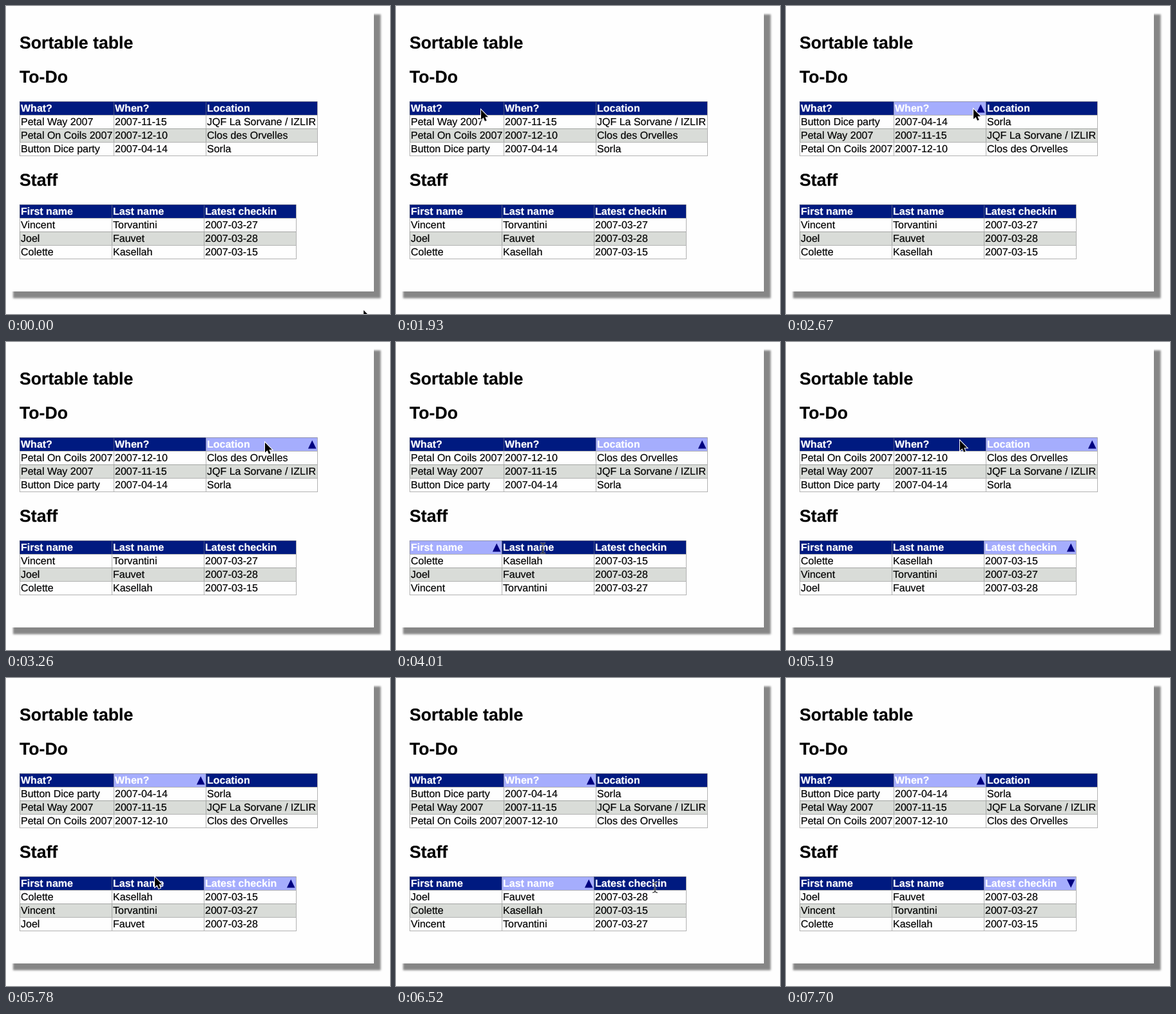
An HTML page for the animation above (8.73 s loop, 596 by 478 pixels).

```html
<!DOCTYPE html>
<html lang="en">
<head>
<meta charset="utf-8">
<title>Sortable table</title>
<style>
  html, body { margin: 0; width: 100%; height: 100%; overflow: hidden; background: #fefefe; }
  svg { display: block; width: 596px; height: 478px; }
  text {
    font: 16px "Liberation Sans", Arial, sans-serif; white-space: pre;
    text-rendering: geometricPrecision; stroke: #000; stroke-width: .2px;
  }
  .title { font-size: 26.67px; font-weight: bold; }
  .head { font-weight: bold; fill: #fff; stroke: #fff; }
  .grid { fill: none; stroke: #808080; stroke-opacity: .6; shape-rendering: crispEdges; }
  .flat { shape-rendering: crispEdges; }
</style>
</head>
<body>
<svg viewBox="0 0 596 478">
  <defs>
    <filter id="soft" x="-5%" y="-5%" width="110%" height="110%"><feGaussianBlur stdDeviation="1.5"/></filter>
  </defs>
  <rect width="596" height="478" fill="#fefefe"/>
  <rect x="11" y="13" width="570.5" height="440.5" fill="#868686" filter="url(#soft)"/>
  <rect class="flat" width="571" height="443" fill="#fefefe"/>
  <text class="title" x="21" y="66">Sortable table</text>
  <text class="title" x="21" y="119">To-Do</text>
  <text class="title" x="21" y="279">Staff</text>
  <g id="tables"></g>
  <path id="arrow" d="M0 0V15.5L3.6 12.2L6 17.8L8.7 16.7L6.3 11.2H11Z" stroke="#fff" stroke-width="2" paint-order="stroke"/>
  <g id="beam" fill="none">
    <path class="bar" stroke="#fff" stroke-opacity=".5" stroke-width="2.4"/>
    <path class="bar" stroke="#222" stroke-width="1.1"/>
  </g>
</svg>
<script>
const LOOP = 8730, STEP = 148.05, LAST = 52, ROW = 21;
const NAVY = '#001a80', LIT = '#a5adfd', BAND = '#d9dcd8';
const $ = id => document.getElementById(id);

function add(parent, tag, attrs, label) {
  const el = document.createElementNS('http://www.w3.org/2000/svg', tag);
  for (const key in attrs) el.setAttribute(key, attrs[key]);
  if (label) el.textContent = label;
  parent.appendChild(el);
  return el;
}

function makeTable(top, cols, heads, rows) {
  const g = add($('tables'), 'g', {});
  const left = cols[0], right = cols[3];
  const label = (c, r, attrs, text) =>
    add(g, 'text', { x: cols[c] + 2, y: top + 16 + r * ROW, ...attrs }, text);

  const cells = heads.map((h, c) => add(g, 'rect', {
    class: 'flat', x: cols[c], y: top, width: cols[c + 1] - cols[c], height: ROW
  }));
  add(g, 'rect', { class: 'flat', x: left, y: top + 2 * ROW, width: right - left, height: ROW, fill: BAND });
  let lines = cols.map(x => `M${x + .5} ${top}V${top + 4 * ROW + 1}`).join('');
  for (let r = 0; r <= 4; r++) lines += `M${left} ${top + r * ROW + .5}H${right + 1}`;
  add(g, 'path', { class: 'grid', d: lines });
  heads.forEach((h, c) => label(c, 0, { class: 'head' }, h));
  const texts = rows.map((row, r) => row.map((v, c) => label(c, r + 1, {})));
  const mark = add(g, 'path', { d: 'M-6.3 6.5H6.3L0-6.5Z', fill: '#000080' });

  return {
    headAt: ([x, y]) => y >= top && y < top + ROW ? heads.findIndex((h, c) => x >= cols[c] && x < cols[c + 1]) : -1,
    show({ col, dir }) {
      const order = rows.slice();
      if (dir) order.sort((a, b) => (a[col] < b[col] ? -dir : dir));
      texts.forEach((line, r) => line.forEach((t, c) => { t.textContent = order[r][c]; }));
      cells.forEach((cell, c) => cell.setAttribute('fill', c === col ? LIT : NAVY));
      mark.setAttribute('visibility', dir ? 'visible' : 'hidden');
      if (dir) mark.setAttribute('transform', `translate(${cols[col + 1] - 7.8} ${top + 11}) scale(1 ${dir})`);
    }
  };
}

const tables = [
  makeTable(148, [21, 167, 310, 483], ['What?', 'When?', 'Location'], [
    ['Petal Way 2007', '2007-11-15', 'JQF La Sorvane / IZLIR'],
    ['Petal On Coils 2007', '2007-12-10', 'Clos des Orvelles'],
    ['Button Dice party', '2007-04-14', 'Sorla']
  ]),
  makeTable(308, [21, 164, 307, 450], ['First name', 'Last name', 'Latest checkin'], [
    ['Vincent', 'Torvantini', '2007-03-27'],
    ['Joel', 'Fauvet', '2007-03-28'],
    ['Colette', 'Kasellah', '2007-03-15']
  ])
];
const labels = [...$('tables').querySelectorAll('text')];

// The pointer rests one step at each stop, then eases to the next.
const stop = (step, x, y) => ({ step, x, y });
const trips = [
  [stop(0, 555, 472), stop(1, 520, 345), stop(3, 583, 89)],
  [stop(8, 584, 195), stop(10, 400, 128), stop(13, 132, 161), stop(16, 211, 160),
   stop(18, 291, 160), stop(21, 402, 156), stop(25, 132, 315), stop(27, 228, 320),
   stop(30, 400, 320), stop(35, 270, 153), stop(40, 228, 319), stop(44, 402, 325),
   stop(48, 407, 323), stop(51, 550, 458)]
];
const clicks = [14, 18, 21, 25, 28, 30, 36, 40, 45, 48];

function pointerAt(k) {
  const trip = trips.find(t => k >= t[0].step && k <= t[t.length - 1].step);
  if (!trip) return null;
  const i = Math.max(1, trip.findIndex(s => s.step >= k));
  const a = trip[i - 1], b = trip[i];
  const leave = Math.min(a.step + 1, b.step - 1);
  const f = Math.max(0, (k - leave) / (b.step - leave));
  const ease = f * (2 - f);
  return [a.x + (b.x - a.x) * ease, a.y + (b.y - a.y) * ease].map(Math.round);
}

// Each click sorts by the header under the pointer; a repeat reverses it.
function sortsAt(k) {
  const sorts = tables.map(() => ({ col: -1, dir: 0 }));
  for (const click of clicks.filter(c => c <= k)) {
    const pos = pointerAt(click);
    tables.forEach((table, n) => {
      const col = table.headAt(pos);
      if (col >= 0) sorts[n] = { col, dir: col === sorts[n].col ? -sorts[n].dir : 1 };
    });
  }
  return sorts;
}

function overText([x, y]) {
  return labels.some(el => {
    const b = el.getBBox();
    return x >= b.x && x <= b.x + b.width && y >= b.y && y <= b.y + b.height;
  });
}

function draw(k) {
  sortsAt(k).forEach((sort, n) => tables[n].show(sort));
  const pos = pointerAt(k);
  const shape = pos && (overText(pos) ? 'beam' : 'arrow');
  for (const id of ['arrow', 'beam']) {
    $(id).setAttribute('visibility', id === shape ? 'visible' : 'hidden');
    if (pos) $(id).setAttribute('transform', `translate(${pos})`);
  }
}

document.querySelectorAll('.bar').forEach(bar =>
  bar.setAttribute('d', 'M-4-8Q0-8 0-5V5Q0 8-4 8M4-8Q0-8 0-5M4 8Q0 8 0 5M-2 3H2'));

let shown = -1;
const start = performance.now();
function tick(now) {
  const k = Math.min(LAST, Math.floor((Math.max(0, now - start) % LOOP) / STEP));
  if (k !== shown) draw(shown = k);
  requestAnimationFrame(tick);
}
tick(start);
</script>
</body>
</html>
```
